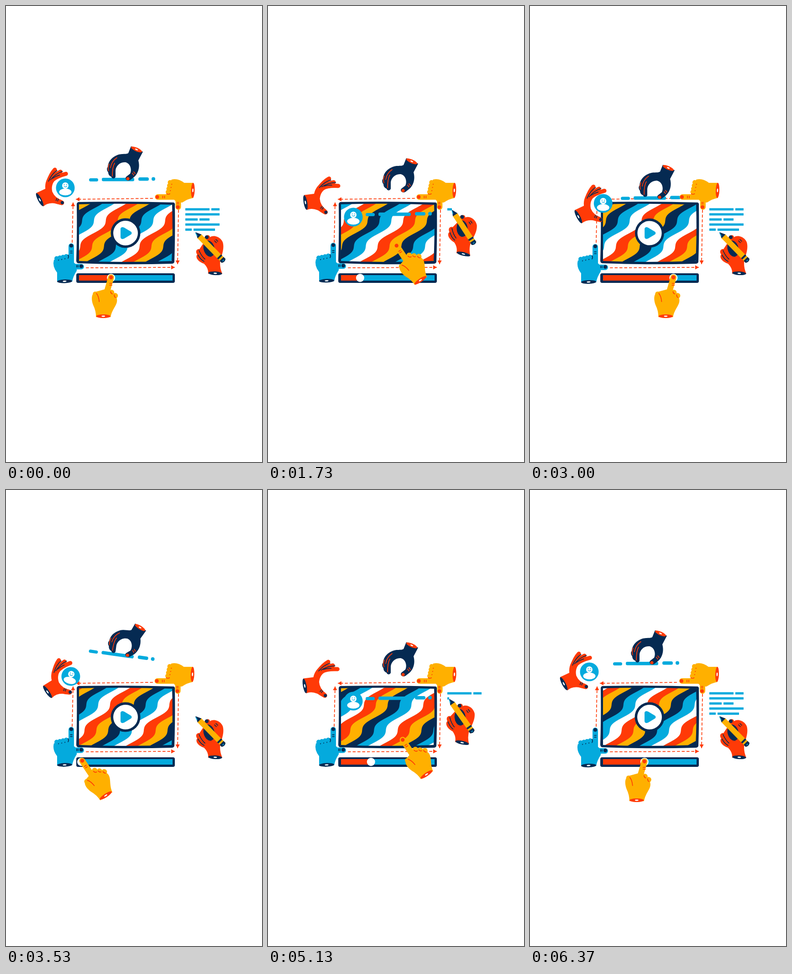
Animation of 561 by 998 pixels, one loop 6410 ms. Source, as an HTML page:

```html
<!DOCTYPE html>
<html lang="en">
<head>
<meta charset="utf-8">
<title>Video editing hands</title>
<style>
  html, body { margin: 0; width: 100%; height: 100%; overflow: hidden; background: #fff; }
  svg { display: block; width: 100vw; height: 100vh; --red: #ff3a07; --blue: #04aadd; --yellow: #ffb000; --navy: #052a52; }
  .red { fill: var(--red); } .blue { fill: var(--blue); } .yellow { fill: var(--yellow); }
  .navy { fill: var(--navy); } .white { fill: #fff; }
  .redHand { --skin: var(--red); --line: var(--navy); }
  .blueHand { --skin: var(--blue); --line: var(--navy); }
  .yellowHand { --skin: var(--yellow); --line: var(--red); }
  .navyHand { --skin: var(--navy); --line: var(--red); }
  .skin { fill: var(--skin); }
  .nail { fill: var(--line); }
  .limb, .ln, .text, .dash { fill: none; stroke-linecap: round; stroke-linejoin: round; }
  .limb { stroke: var(--skin); stroke-width: 12; }
  .ln { stroke: var(--line); stroke-width: 1.7; }
  .dash { stroke: var(--red); stroke-width: 1.7; stroke-dasharray: 6.5 4; stroke-linecap: butt; }
  .text { stroke: var(--blue); stroke-width: 5; stroke-linecap: butt; }
</style>
</head>
<body>
<svg viewBox="0 0 561 998">
  <defs>
    <clipPath id="view"><path d="M160 434Q262 431 364 435Q366 497 363 558Q262 562 160 558Z"/></clipPath>
    <clipPath id="track"><rect x="160" y="589" width="205" height="12"/></clipPath>
    <g id="corner">
      <path class="skin" d="M412 387H392Q378 376 364 380L358 412L376 430H388Q400 422 412 420Z"/>
      <path class="limb" d="M380 418H334M379 420V440"/>
      <path class="ln" d="M345 416V420M349 416V420M376 430H380M376 433H380"/>
      <circle class="nail" cx="333" cy="418" r="4"/><circle class="nail" cx="378" cy="440" r="4"/>
    </g>
  </defs>

  <g id="arrows"></g>

  <g id="screen">
    <path class="navy" d="M159 429Q262 427 367 430Q371 431 370 437Q371 497 369 560Q368 564 363 564Q262 567 158 563Q154 562 154 557Q156 497 155 434Q155 430 159 429Z"/>
    <g clip-path="url(#view)"><g id="bands"></g></g>
    <g id="play">
      <circle class="navy" r="32.5"/><circle class="white" r="27"/>
      <path class="blue" d="M-11-10Q-9-15-3-12L12-3Q15 0 12 3L-3 12Q-10 15-11 9Z"/>
    </g>
    <rect class="navy" x="154" y="585" width="216" height="21" rx="4"/>
    <g clip-path="url(#track)">
      <rect class="blue" x="158" y="586" width="210" height="18"/>
      <rect class="red" id="fill" x="158" y="586" height="18"/>
    </g>
    <circle class="white" id="knob" cy="595" r="9"/>
  </g>

  <g id="caption" class="blue">
    <rect x="182" y="377" width="20" height="7" rx="3.5"/>
    <rect x="210" y="376" width="71" height="7.5" rx="3"/>
    <rect x="290" y="375" width="23" height="7.5" rx="3.5"/>
    <circle cx="323" cy="378.5" r="4"/>
  </g>

  <use id="cornerTR" href="#corner" class="yellowHand"/>
  <use id="cornerBL" href="#corner" class="blueHand"/>

  <g id="navyHand" class="navyHand">
    <path class="skin" d="M274 307L300 319L290 338C294 352 290 366 281 374L272 381C265 384 260 379 263 374L272 367C276 358 273 345 262 342C250 341 241 350 240 360V374C238 379 232 378 231 374Q224 371 224 364Q219 358 223 352C224 340 232 332 240 328C252 321 262 326 268 322Z"/>
    <path class="ln" d="M243 332Q231 340 229 354M238 344Q233 352 233 372M226 346Q223 354 225 361M277 366L280 370M280 363L283 367"/>
    <circle class="nail" cx="267" cy="378" r="3.5"/>
  </g>

  <g id="redHand" class="redHand">
    <path class="skin" d="M66 404L88 400Q91 380 112 370L118 385Q102 392 101 410Q103 425 117 434L112 443Q90 428 74 436Z"/>
    <path class="limb" style="stroke-width:10" d="M98 429Q106 435 115 439"/>
    <path class="ln" d="M99 386Q110 372 123 368M104 384Q118 374 134 373M109 382Q118 379 126 379M107 433L110 429M104 431L107 427"/>
    <circle class="nail" cx="116" cy="439" r="3.5"/>
  </g>

  <g id="avatar">
    <circle class="blue" r="20.5"/>
    <circle class="white" cy="-5" r="7"/><ellipse class="white" cy="9" rx="13.5" ry="7.5"/>
    <circle class="blue" cx="-2.5" cy="-7" r="1"/><circle class="blue" cx="3" cy="-7" r="1"/>
    <path class="text" style="stroke-width:1.2" d="M-3-4Q0 0 3.5-4"/>
  </g>

  <g id="lines"></g>

  <g id="pencilHand" class="redHand">
    <path id="raised" class="limb" d="M470 536Q466 512 456 494"/>
    <path class="skin" d="M443 586Q444 574 434 564C421 560 414 550 419 544C414 537 418 531 424 532L432 520L435 506C439 499 447 501 447 506C455 500 470 505 475 517C479 530 473 545 470 555Q467 570 474 586Z"/>
    <ellipse class="navy" cx="445" cy="531" rx="12" ry="18" transform="rotate(-15 445 531)"/>
    <path class="ln" d="M423 535Q428 547 436 554M421 545Q426 555 434 559M457 514L461 518M460 511L464 515"/>
    <circle class="nail" cx="440" cy="506" r="4"/>
    <g transform="translate(415 495) rotate(-44.5)">
      <path class="yellow" d="M-6 12H6V88Q0 92-6 88Z"/>
      <path class="navy" d="M0 0L6 13H-6ZM-6 74H6V78H-6ZM-6 82H6V88Q0 93-6 88Z"/>
      <path class="text" style="stroke-width:1.7" d="M-1 2L-3 9M-2 87H2"/>
    </g>
  </g>

  <g id="finger" class="yellowHand">
    <g id="fist">
      <path class="skin" d="M-15 94Q-15 80-21 68C-27 52-24 40-14 38L8 32Q30 42 31 56C32 68 20 76 17 94Z"/>
      <path class="limb" style="stroke-width:10" d="M-17 43L-12 58"/>
      <path class="ln" d="M8 33Q9 38 13 38M17 38Q18 43 21 43M25 45Q25 50 28 51M-14 42Q-9 48-8 60"/>
    </g>
    <path id="index" class="limb" style="stroke-width:13"/>
    <path class="ln" d="M-3 13H2M-3 17H2"/>
    <circle class="nail" r="4.2"/>
  </g>
</svg>
<script>
const T = 3205, STEP = 40;
const $ = id => document.getElementById(id);
const set = (id, name, value) => $(id).setAttribute(name, value);
const move = (id, value) => set(id, 'transform', value);

function add(parent, tag, attrs) {
  const el = document.createElementNS('http://www.w3.org/2000/svg', tag);
  for (const name in attrs) el.setAttribute(name, attrs[name]);
  return $(parent).appendChild(el);
}

const ramp = (p, a, b) => Math.min(1, Math.max(0, (p - a) / (b - a)));
const ease = (p, a, b) => (1 - Math.cos(Math.PI * ramp(p, a, b))) / 2;
const mix = (a, b, k) => a.map((v, i) => v + (b[i] - v) * k);
// start point plus weighted offsets
const blend = (from, ...offsets) =>
  offsets.reduce((sum, [w, ...by]) => sum.map((v, i) => v + w * by[i]), from);

// open end of a wrist
function cut(parent, x, y, r, turn) {
  const transform = `translate(${x} ${y}) rotate(${turn})`;
  add(parent, 'ellipse', { class: 'nail', rx: r, ry: 4, transform });
  add(parent, 'ellipse', { class: 'white', rx: r * 0.25, ry: 1.4, transform });
}
cut('corner', 411, 403.5, 16.5, 92);
cut('navyHand', 286, 314, 13, 24);
cut('redHand', 70, 420, 16, 77);
cut('pencilHand', 458.5, 585, 15, 3);
cut('fist', 1, 92, 15.5, 0);

for (let i = 0; i < 4; i++) {
  const x = 361 - i * 1.5, y = 386 + i * 7;
  add('corner', 'circle', { class: 'skin', cx: x, cy: y, r: 5 });
  add('corner', 'path', { class: 'ln', d: `M${x - 3} ${y + 4}q4 2 7 0` });
}
for (let i = 0; i < 3; i++) {
  $('fist').prepend(add('fist', 'circle', { class: 'skin', cx: 11 + 8 * i, cy: 33 + 7 * i, r: 6 }));
  $('redHand').prepend(add('redHand', 'path', {
    class: 'limb', style: 'stroke-width:9', d: `M${98 + 4 * i} 387Q${108 + 4 * i} ${372 + 4 * i} ${119 + 10.5 * i} ${365 + 7.5 * i}`
  }));
}

// diagonal wavy bands
const PERIOD = 130, BAND = PERIOD / 5;
const edge = y => 435 - y - 8 * Math.sin(2 * Math.PI * (y - 498) / 56);
const ys = Array.from({ length: 47 }, (_, i) => 428 + i * 3);
const order = ['navy', 'blue', 'white', 'red', 'yellow'];
for (let i = -10; i < 20; i++) {
  const x = 185 + i * BAND;
  const left = ys.map(y => [x + edge(y), y]);
  const right = ys.map(y => [x + BAND + 0.6 + edge(y), y]).reverse();
  add('bands', 'polygon', { class: order[(i + 10) % 5], points: left.concat(right).join(' ') });
}

// written rows: where each dash ends, with a fixed gap between dashes
const LEFT = 393, GAP = 4, WRITE = 1695, ROW = 215, STROKE = 0.87;
const rows = [[53, 75], [75], [27, 53], [75], [14, 65]];
const rowY = r => 445 + r * 11.1;
const writeEnd = WRITE + (4 + STROKE) * ROW;
const penX = (r, p) => rows[r].at(-1) * ramp(p, WRITE + r * ROW, WRITE + (r + STROKE) * ROW);
const dashes = rows.flatMap((ends, r) => ends.map((end, i) =>
  ({ r, end, from: i ? ends[i - 1] + GAP : 0, el: add('lines', 'path', { class: 'text' }) })));

const arrows = Array.from({ length: 4 }, () => [
  add('arrows', 'path', { class: 'dash' }), add('arrows', 'path', { class: 'red', d: 'M0 0L-8-4.5V4.5Z' })]);

function drawArrows(d) {
  const l = 146 - d, r = 377 + d, t = 422 - d, b = 573 + d;
  const ends = [
    [r - 55, t - 1, l + 7, t + 1],
    [l - 1, b - 55, l + 1, t + 8],
    [r + 1, t + 24, r - 1, b - 8],
    [l + 29, b, r - 7, b - 1]
  ];
  ends.forEach(([x1, y1, x2, y2], i) => {
    const turn = Math.atan2(y2 - y1, x2 - x1) * 180 / Math.PI;
    arrows[i][0].setAttribute('d', `M${x1} ${y1}L${x2} ${y2}`);
    arrows[i][1].setAttribute('transform', `translate(${x2} ${y2}) rotate(${turn})`);
  });
}

// plays forward after the click, is dragged back across the loop's seam
function knobAt(p) {
  if (p >= 2880 || p < 245) return 332 - 167 * ease(p < 245 ? p + T : p, 2880, 3450);
  return Math.min(332, 165 + Math.max(0, p - 1410) * 0.119);
}

function penAt(p) {
  const idle = [415, 495, 0];
  if (p < WRITE) return mix(idle, [LEFT, rowY(0) + 1, 8], ease(p, 1560, WRITE));
  const r = Math.min(4, Math.floor((p - WRITE) / ROW));
  const back = r < 4 ? ramp(p, WRITE + (r + STROKE) * ROW, WRITE + (r + 1) * ROW) : 0;
  const x = penX(r, p) * (1 - back);
  return mix([LEFT + x, rowY(r + back) + 1, 8 + x * 0.32], idle, ease(p, writeEnd, 2990));
}

function draw(p) {
  const zoomed = ease(p, 800, 1200) - ease(p, 1420, 1640);
  const zoom = `translate(262 497) scale(${1 + 0.157 * zoomed}) translate(-262 -497)`;
  const d = 16 * zoomed, knob = knobAt(p), sway = 1.5 + 1.5 * Math.sin(p / T * Math.PI * 8);

  move('screen', zoom);
  move('bands', `translate(${((knob - 165) * 1.85) % PERIOD} 0)`);
  move('play', `translate(262 497) scale(${1 - ease(p, 1480, 1610) + ease(p, 2880, 3010)})`);
  set('fill', 'width', Math.max(0, knob - 158));
  set('knob', 'cx', knob);
  drawArrows(d);
  move('cornerTR', `translate(${d - sway} ${-d})`);
  move('cornerBL', `translate(${-275 - d} ${193 + d - sway}) matrix(0 1 1 0 0 0)`);

  // both carrying hands share one schedule: lift, place, rest, fetch
  const lift = ease(p, 80, 330) - ease(p, 330, 590);
  const place = ease(p, 330, 600) - ease(p, 2880, 3130);
  const rest = ease(p, 660, 950) - ease(p, 2620, 2850);
  const onScreen = p > 600 && p < 2880;

  const [nx, ny, nr] = blend([287, 313, 0], [lift, 8, -13, 8], [place, 32, 76, 0], [rest, -3, -50, 0], [zoomed, 6, -11, 0]);
  const navy = `translate(${nx} ${ny}) rotate(${nr}) translate(-287 -313)`;
  move('navyHand', navy);
  move('caption', onScreen ? zoom + ' translate(32 76)' : navy);

  const near = ease(p, 1400, 1700) - ease(p, 1750, 2500);
  const [rx, ry, rr] = blend([74, 424, -15], [lift, 17, 18, -7], [place, 60, 70, 0],
    [rest, -64, -74, 15], [zoomed, -6, -7, -3], [near, 12, 10, 3]);
  move('redHand', `translate(${rx} ${ry}) rotate(${rr}) translate(-70 -420)`);
  const [ax, ay, tilt] = blend([rx + 56, ry - 26, 0], [lift, -5, -8, 14], [place, -3, -6, 0]);
  move('avatar', onScreen ? zoom + ' translate(187 462)' : `translate(${ax} ${ay}) rotate(${tilt})`);

  const wipe = 1 - ease(p, 90, 280);
  for (const { r, from, end, el } of dashes) {
    const x = p < WRITE ? from + (end - from) * wipe : Math.min(end, penX(r, p));
    el.setAttribute('d', x > from ? `M${LEFT + from} ${rowY(r)}H${LEFT + x}` : '');
  }
  const [px, py, pr] = penAt(p);
  move('pencilHand', `translate(${px} ${py}) rotate(${pr}) translate(-415 -495)`);
  set('raised', 'visibility', p > 900 && p < 1560 ? 'visible' : 'hidden');

  // pointing hand: drag, hover, click, drift away, return to the knob
  const lean = ease(p, 180, 330) - ease(p, 600, 900) + ease(p, 1530, 1700) - ease(p, 2700, 2880);
  const grip = [knob, 594];
  let tip = mix(grip, [318, 485], ease(p, 270, 950));
  tip = mix(tip, [267, 500], ease(p, 1340, 1470));
  tip = mix(tip, [338, 618], ramp(p, 1500, 2560));
  tip = mix(tip, grip, ease(p, 2680, 2880));
  const bend = 1 - lean;
  move('finger', `translate(${tip}) rotate(${-34 * lean})`);
  move('fist', `translate(${-18 * bend} ${-7 * bend})`);
  set('index', 'd', `M0 0L${-11 * bend} 38`);
}

const start = performance.now();
function tick() {
  const p = (performance.now() - start) % T;
  draw(Math.floor(p / STEP) * STEP);
  requestAnimationFrame(tick);
}
tick();
</script>
</body>
</html>
```
